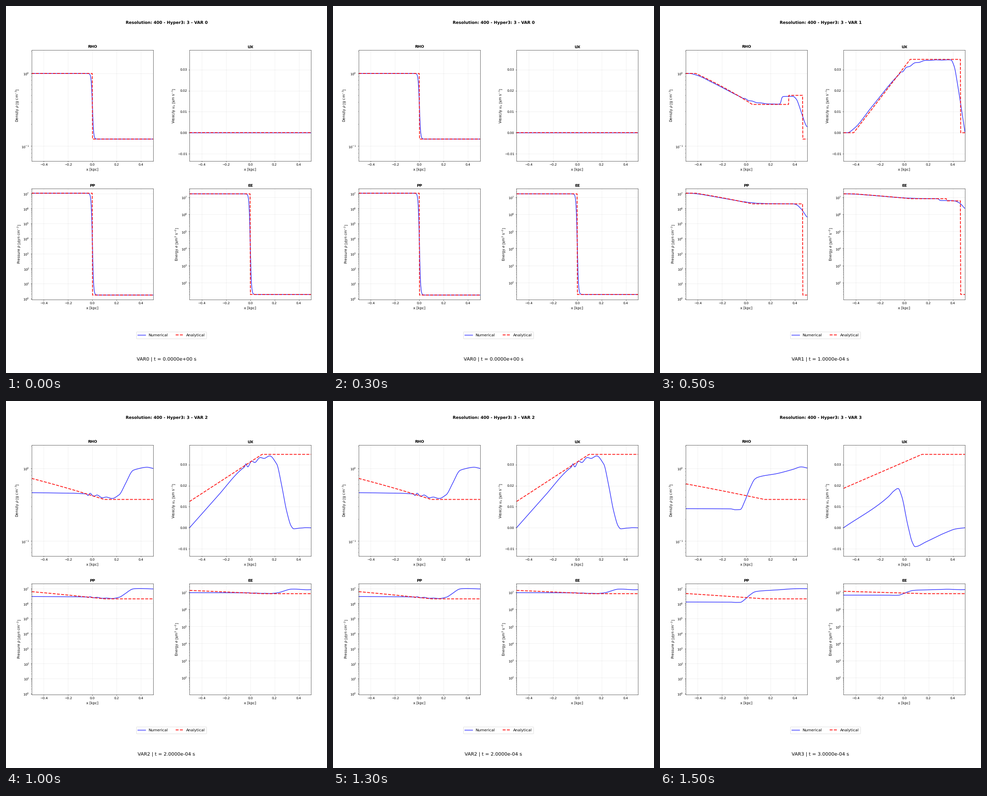
These frames come from a looping animation (700 px wide and 800 px high, 2 s). A matplotlib script:

```python
import numpy as np
import matplotlib.pyplot as plt
from matplotlib.animation import FuncAnimation

# Unhinted glyphs keep the text at its true width
plt.rcParams["text.hinting"] = "no_hinting"

# Shock tube states (cgs), gamma = 5/3
P_L, P_R, RHO_R = 1.04e7, 1.7, 0.125
E_L, E_R = 1.5 * P_L, 1.5 * P_R / RHO_R
C_L = np.sqrt(5 / 3 * P_L)
U_STAR = 3485.7
KM = 1e5

# Panel scale: pixels per kpc, per decade of density, per km/s
PX_X, PX_RHO, PX_U = 264.8, 158.4, 4588

x = np.linspace(-0.5, 0.5, 400)
px = (x + 0.5) * PX_X


def smooth(*knots):
    """Shape-preserving cubic through a few (x, y) panel points."""
    kx, ky = np.array(knots, float).T
    h = np.diff(kx)
    d = np.diff(ky) / h
    m = np.zeros_like(kx)
    m[0], m[-1] = d[0], d[-1]
    same = d[:-1] * d[1:] > 0
    w1, w2 = 2 * h[1:] + h[:-1], h[1:] + 2 * h[:-1]
    a, b = np.where(same, d[:-1], 1), np.where(same, d[1:], 1)
    m[1:-1] = np.where(same, (w1 + w2) / (w1 / a + w2 / b), 0)
    k = np.clip(np.searchsorted(kx, px) - 1, 0, len(h) - 1)
    s, hk = (px - kx[k]) / h[k], h[k]
    return ((1 + 2 * s) * (1 - s) ** 2 * ky[k] + s * (1 - s) ** 2 * hk * m[k]
            + s * s * (3 - 2 * s) * ky[k + 1] + s * s * (s - 1) * hk * m[k + 1])


def ripple(start, amp):
    """Decaying wave train that lengthens to the right."""
    d = px - start
    phase = 0.155 * np.maximum(d, 0) ** 0.75
    decay = np.where(d < 0, (d / 2) ** 2, d / 45)
    return amp * np.cos(2 * np.pi * phase) * np.exp(-decay)


def initial_step():
    mix = (1 + np.tanh(x / 0.01)) / 2
    rho = RHO_R ** mix
    e = E_L * (E_R / E_L) ** mix
    return rho, np.zeros_like(x), rho * e / 1.5, e


def expansion():
    """Simple wave up to the contact, then a shock smeared at the wall."""
    u = smooth((0, 0), (8, 0), (23, 9.3), (60, 54.5), (118, 124), (137, 141),
               (158, 152.3), (190, 158.3), (234, 158.8), (241, 146), (250, 97),
               (265, 0))
    u = (u + ripple(125, 2)) / PX_U
    c = 1 - u * KM / (3 * C_L)
    tail = np.clip(u / u.max(), 0, 1) ** 1.6
    past = (1 + np.tanh((px - 208.5) / 2)) / 2
    rho = (1 - past) * c ** 3 + past * (0.185 + 0.299 * tail)
    p = (1 - past) * P_L * c ** 5 + past * (2.73e5 + 1.764e6 * tail)
    return rho, u, p, 1.5 * p / rho


def reflection(depth, height):
    """Nearly adiabatic flow, slightly cooler beside the right wall."""
    rho = 10 ** (-depth / PX_RHO)
    cooling = 0.065 * np.exp(-((x - 0.46) / 0.07) ** 2)
    e = E_L * rho ** (2 / 3) * 10 ** -cooling
    return rho, height / PX_U, rho * e / 1.5, e


def early_reflection():
    depth = smooth((0, 52.8), (84, 53.8), (118, 55.5), (139, 59), (160, 63.3),
                   (178, 64.5), (190, 58.5), (204, 34), (222, 3.5), (236, -.2),
                   (252, -2.8), (265, .1))
    height = smooth((0, 0), (60, 67.5), (118, 131), (140, 144), (160, 152.5),
                    (176, 155), (190, 140), (200, 96.3), (212, 36.3), (222, 2.8),
                    (227, -2.7), (240, -.5), (265, 0))
    return reflection(depth + ripple(123, 3), height + ripple(123, 5))


def late_reflection():
    depth = smooth((0, 87.6), (98, 88.1), (108, 90), (119, 89.5), (129, 71),
                   (140, 43), (151, 23), (158, 19), (200, 11), (234, 2),
                   (252, -3.4), (265, -1))
    height = smooth((0, 0), (98, 67.8), (109, 79.5), (119, 85.6), (127, 68.3),
                    (140, 6.3), (150, -31.7), (156, -41.2), (180, -30.7),
                    (220, -11.7), (245, -2.5), (265, 0))
    return reflection(depth, height)


def analytical(step):
    """Exact Riemann solution: fan, contact, strong shock."""
    xi = x * 1e4 / max(step, 1e-9)
    u = np.clip(0.75 * (C_L + xi), 0, U_STAR)
    c = 1 - u / (3 * C_L)
    rho, p = c ** 3, P_L * c ** 5
    rho[xi > U_STAR] = 4 * RHO_R
    ahead = xi > 4 / 3 * U_STAR
    rho[ahead], u[ahead], p[ahead] = RHO_R, 0, P_R
    return rho, u / KM, p, 1.5 * p / rho


NUMERICAL = [initial_step, expansion, early_reflection, late_reflection]

PANELS = [
    ("RHO", r"Density $\rho$ [g cm$^{-3}$]", (0.0625, 2.1), "log"),
    ("UX", r"Velocity $u_x$ [km s$^{-1}$]", (-0.0134, 0.0393), "linear"),
    ("PP", r"Pressure $p$ [dyn cm$^{-2}$]", (P_R / 2, 2 * P_L), "log"),
    ("EE", r"Energy $e$ [km$^2$ s$^{-2}$]", (E_R / 2, 2 * E_L), "log"),
]

fig, axes = plt.subplots(2, 2, figsize=(14, 16), dpi=50)
fig.subplots_adjust(left=0.08, right=0.95, top=0.88, bottom=0.2,
                    wspace=0.3, hspace=0.25)

lines = []
for ax, (name, label, ylim, scale) in zip(axes.flat, PANELS):
    ax.set_yscale(scale)
    num, = ax.plot(x, x + 1, "b-", lw=2, alpha=0.8, label="Numerical")
    ana, = ax.plot(x, x + 1, "r--", lw=2.5, alpha=0.9, label="Analytical")
    lines.append((num, ana))
    ax.set_xlim(-0.5, 0.5)
    ax.set_ylim(*ylim)
    ax.set_title(name, fontsize=12, fontweight="bold")
    ax.set_xlabel("x [kpc]", fontsize=11)
    ax.set_ylabel(label, fontsize=11, labelpad=3)
    ax.grid(True, alpha=0.3)

fig.legend(handles=lines[0], loc="center", bbox_to_anchor=(0.515, 0.1031),
           ncol=2, fontsize=12)
title = fig.suptitle("", y=0.96, fontsize=13, fontweight="bold")
clock = fig.text(0.5, 0.03, "", ha="center", va="bottom", fontsize=15)


def update(step):
    for (num, ana), yn, ya in zip(lines, NUMERICAL[step](), analytical(step)):
        num.set_ydata(yn)
        ana.set_ydata(ya)
    title.set_text(f"Resolution: 400 - Hyper3: 3 - VAR {step}")
    clock.set_text(f"VAR{step} | t = {step * 1e-4:.4e} s")


anim = FuncAnimation(fig, update, frames=4, interval=500, repeat=True, repeat_delay=0)
plt.show()
```
